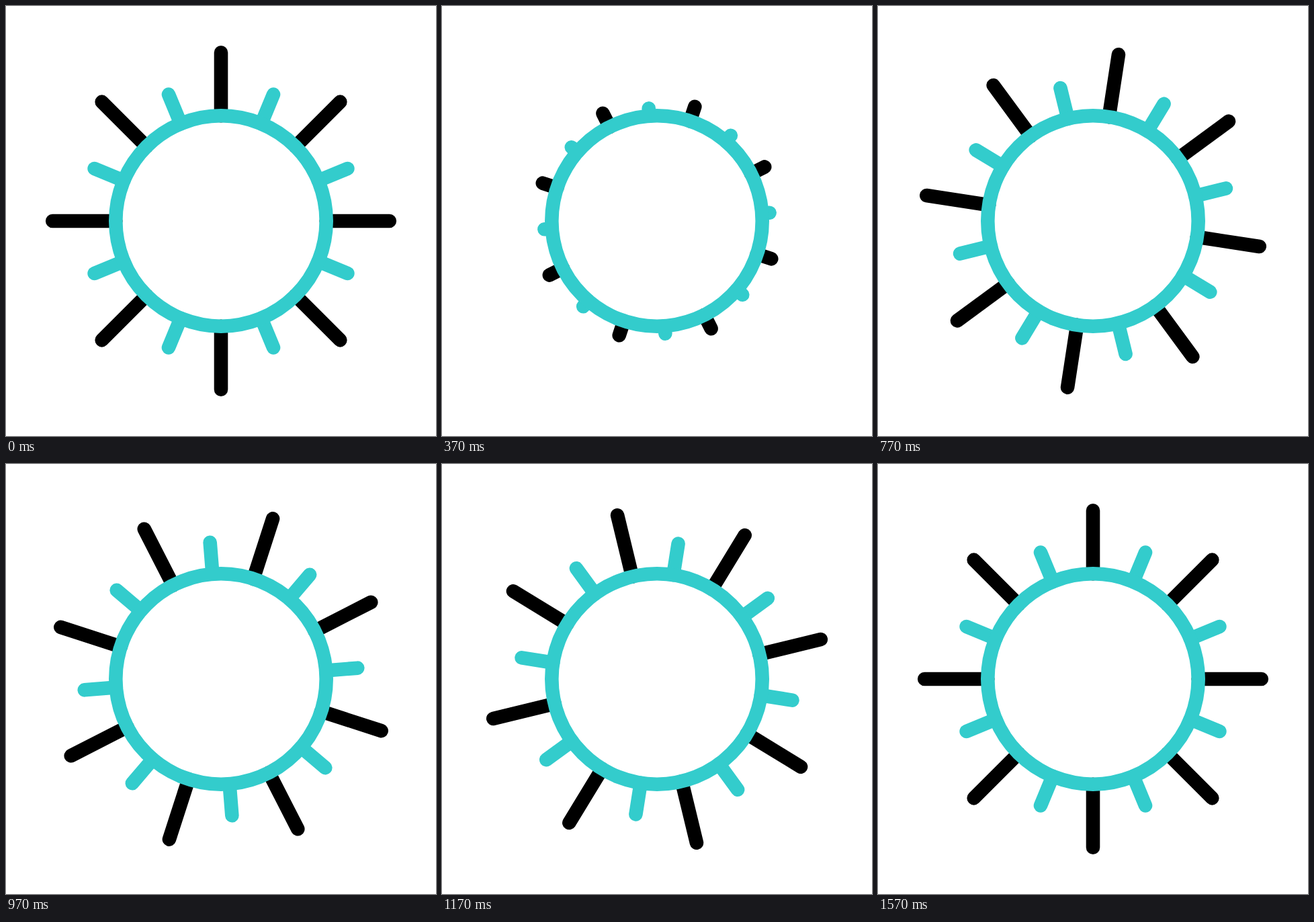
An HTML page that plays this animation: 640 by 640 pixels, repeating every 1670 ms.

```html
<!DOCTYPE html>
<html lang="en">
<head>
<meta charset="utf-8">
<title>Spinning sun</title>
<style>
  html, body { margin: 0; width: 100%; height: 100%; overflow: hidden; background: #fff; }
  svg { display: block; width: 100vw; height: 100vh; }
  path, circle { fill: none; stroke-width: 20.6; stroke-linecap: round; }
</style>
</head>
<body>
<svg viewBox="0 0 640 640">
  <g id="rays">
    <path id="long" stroke="#000"/>
    <path id="short" stroke="#33cccc"/>
  </g>
  <circle cx="320" cy="320" r="156.7" stroke="#33cccc"/>
</svg>
<script>
  const LOOP = 1670, LAST = 47, BASE = 156.7;
  const rays = document.getElementById('rays');
  const long = document.getElementById('long');
  const short = document.getElementById('short');

  // step, degrees, degrees per step
  const spin = [
    [0, 0, 0], [11, 18.3, 2.9], [23, 53.71, 1.25], [29, 62.9, 1.95],
    [35, 76.41, 2.08], [41, 86.8, 1.12], [47, 90, 0]
  ];

  const ease = x => {
    x = Math.min(1, Math.max(0, x));
    return x * x * (3 - 2 * x);
  };

  function angleAt(s) {
    let i = 0;
    while (i < spin.length - 2 && s >= spin[i + 1][0]) i++;
    const [s0, a0, v0] = spin[i], [s1, a1, v1] = spin[i + 1];
    const d = s1 - s0, x = (s - s0) / d, e = ease(x);
    return a0 + (a1 - a0) * e + d * x * (1 - x) * (v0 * (1 - x) - v1 * x);
  }

  // Rays sink into the ring, then grow out again.
  const growth = s => s < 16 ? 1 - ease(s / 16.15) : ease((s - 15.5) / 7.7);

  function star(length, offset) {
    let d = '';
    for (let i = 0; i < 8; i++) {
      const a = (i * 45 + offset) * Math.PI / 180;
      const at = r => (320 + r * Math.sin(a)).toFixed(2) + ' ' + (320 - r * Math.cos(a)).toFixed(2);
      d += 'M' + at(BASE) + 'L' + at(BASE + length);
    }
    return d;
  }

  // 30 steps per second, starting on whole hundredths of a second
  function stepAt(t) {
    let k = Math.round(t * 0.03);
    if (Math.round(k * 10 / 3) * 10 > t) k--;
    return Math.min(k, LAST);
  }

  function draw(t) {
    const s = stepAt(t), g = growth(s);
    long.setAttribute('d', star(94.1 * g, 0));
    short.setAttribute('d', star(47.2 * g, 22.5));
    rays.setAttribute('transform', `rotate(${angleAt(s).toFixed(3)} 320 320)`);
  }

  const start = performance.now();
  function tick() {
    draw((performance.now() - start) % LOOP);
    requestAnimationFrame(tick);
  }
  draw(0);
  requestAnimationFrame(tick);
</script>
</body>
</html>
```
